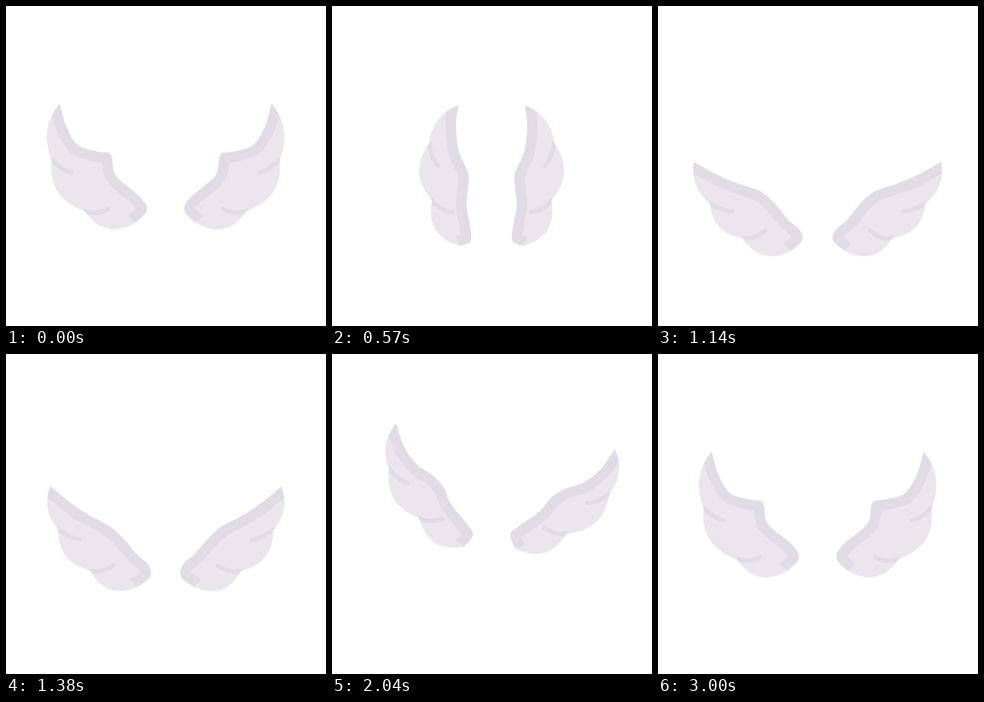
An HTML page with a canvas that plays this animation: 400 px wide and 400 px high, repeating every 5.09 s.

```html
<!DOCTYPE html>
<html lang="en">
<head>
<meta charset="utf-8">
<title>Wings</title>
<style>
html, body { margin: 0; width: 100%; height: 100%; overflow: hidden; background: #fff; }
canvas { display: block; width: 100vw; height: 100vh; }
</style>
</head>
<body>
<canvas id="stage" width="400" height="400"></canvas>
<script>
const LOOP = 5090, MOVE = 3000, STEP = 30;
const DARK = '#e0dbe5', LIGHT = '#ebe6ee';
const BAND = 13, CREASE = 5.5;
const RAD = Math.PI / 180;
const ctx = document.getElementById('stage').getContext('2d');

// Key points of the left wing: its upper edge from the tip round the
// shoulder and the root, then the two notches between the feathers.
const TIP = 0, ROOT = 7, ROOT_END = 8, INNER_NOTCH = 9, OUTER_NOTCH = 10;
const parse = text => text.split(' ').map(pair => pair.split(',').map(Number));
const rest = parse('67,122 75,150 90,174 114,182 131,186 137,212 167,238 176,255 162,271 98,256 57,192');
const fold = parse('158,124 155,147 158,180 170,209 170,228 168,250 173,278 173,294 160,300 125,243 121,172');
const sweep = parse('14,276 38,287 66,295 94,295 118,290 142,277 164,271 182,287 172,316 126,340 38,322');
const glide = parse('45,195 74,211 100,222 128,232 146,247 162,267 177,280 180,293 166,306 106,290 65,247');
const droop = parse('1,218 20,205 48,203 78,205 106,208 130,207 160,214 176,230 162,258 108,273 49,257');
const raised = parse('80,87 90,116 106,138 126,152 139,166 149,188 169,213 176,226 165,241 109,205 71,143');

// A key holds root, length and angle of the wing, the lag angle of the
// right wing, and the points relative to the axis from root to tip.
function key(time, pose, { turn = 0, dx = 0, dy = 0, scale = 1, lag = 0 } = {}) {
  const [rx, ry] = pose[ROOT];
  const ax = pose[TIP][0] - rx, ay = pose[TIP][1] - ry, length = Math.hypot(ax, ay);
  const local = pose.flatMap(([x, y]) => [
    ((x - rx) * ax + (y - ry) * ay) / length ** 2,
    ((y - ry) * ax - (x - rx) * ay) / length ** 2
  ]);
  const angle = Math.atan2(ay, ax) + turn * RAD;
  return { time, values: [rx + dx, ry + dy, length * scale, angle, lag * RAD, ...local] };
}

const keys = [
  key(0, rest),
  key(30, rest),
  key(570, fold),
  key(780, sweep),
  key(885, droop, { turn: -20, dy: 64, scale: 0.95 }),
  key(1140, glide),
  key(1320, glide, { turn: 15, dy: -11 }),
  key(1540, sweep, { dx: -3, dy: -18, scale: 1.05, lag: -3 }),
  key(1680, droop, { lag: -9 }),
  key(2040, raised, { lag: -16 }),
  key(2190, raised, { dy: -6, lag: -15 }),
  key(2700, rest, { dy: -12, lag: -1 }),
  key(3000, rest)
];

// Monotone cubic interpolation: smooth, and still at turning points.
const slope = (i, c) => (keys[i + 1].values[c] - keys[i].values[c]) / (keys[i + 1].time - keys[i].time);
function tangent(i, c) {
  if (i === 0 || i === keys.length - 1) return 0;
  const a = slope(i - 1, c), b = slope(i, c);
  return a * b > 0 ? 2 * a * b / (a + b) : 0;
}
function valuesAt(time) {
  let i = 0;
  while (i < keys.length - 2 && time >= keys[i + 1].time) i++;
  const from = keys[i], to = keys[i + 1], span = to.time - from.time;
  const u = (time - from.time) / span, v = 1 - u;
  return from.values.map((a, c) =>
    a * v * v * (1 + 2 * u) + to.values[c] * u * u * (3 - 2 * u) +
    span * u * v * (tangent(i, c) * v - tangent(i + 1, c) * u));
}

// Smooth curve along the upper edge and round the root.
function upperEdge(points) {
  const path = new Path2D();
  const at = i => points[Math.max(TIP, Math.min(ROOT_END, i))];
  path.moveTo(...points[TIP]);
  for (let i = TIP; i < ROOT_END; i++) {
    const [p, q, r, s] = [at(i - 1), at(i), at(i + 1), at(i + 2)];
    path.bezierCurveTo(
      q[0] + (r[0] - p[0]) / 6, q[1] + (r[1] - p[1]) / 6,
      r[0] - (s[0] - q[0]) / 6, r[1] - (s[1] - q[1]) / 6, r[0], r[1]);
  }
  return path;
}

// A feather is an arc over its chord, as high as the given share of it.
function addFeather(path, [x0, y0], [x1, y1], height) {
  const dx = x1 - x0, dy = y1 - y0;
  path.quadraticCurveTo((x0 + x1) / 2 + 2 * height * dy, (y0 + y1) / 2 - 2 * height * dx, x1, y1);
}

// A crease runs from a notch towards the root and the upper edge.
function drawCrease([x, y], angle, back, up) {
  const cos = Math.cos(angle), sin = Math.sin(angle);
  const point = (b, u) => [x - b * cos - u * sin, y - b * sin + u * cos];
  ctx.beginPath();
  ctx.moveTo(x, y);
  ctx.quadraticCurveTo(...point(back * 0.75, up * 0.25), ...point(back, up));
  ctx.stroke();
}

function drawWing([rx, ry, length, angle, lag, ...local], right) {
  if (right) angle += lag;
  const cos = Math.cos(angle) * length, sin = Math.sin(angle) * length;
  const points = [];
  for (let i = 0; i < local.length; i += 2) {
    const [u, v] = local.slice(i, i + 2);
    points.push([rx + u * cos - v * sin, ry + u * sin + v * cos]);
  }
  const edge = upperEdge(points), outline = new Path2D(edge);
  addFeather(outline, points[ROOT_END], points[INNER_NOTCH], 0.23);
  addFeather(outline, points[INNER_NOTCH], points[OUTER_NOTCH], 0.2);
  addFeather(outline, points[OUTER_NOTCH], points[TIP], 0.15);

  ctx.save();
  if (right) ctx.transform(-1, 0, 0, 1, 399, 0);
  ctx.fillStyle = LIGHT;
  ctx.strokeStyle = DARK;
  ctx.fill(outline);
  ctx.clip(outline);
  ctx.lineWidth = 2 * BAND;
  ctx.stroke(edge);
  ctx.lineWidth = CREASE;
  ctx.lineCap = 'round';
  drawCrease(points[OUTER_NOTCH], angle, 28, 9);
  drawCrease(points[INNER_NOTCH], angle, 17, 24);
  ctx.restore();
}

function draw() {
  const elapsed = performance.now() % LOOP;
  const values = valuesAt(Math.min(MOVE, Math.floor(elapsed / STEP) * STEP));
  ctx.fillStyle = '#fff';
  ctx.fillRect(0, 0, 400, 400);
  drawWing(values, false);
  drawWing(values, true);
  requestAnimationFrame(draw);
}
draw();
</script>
</body>
</html>
```
